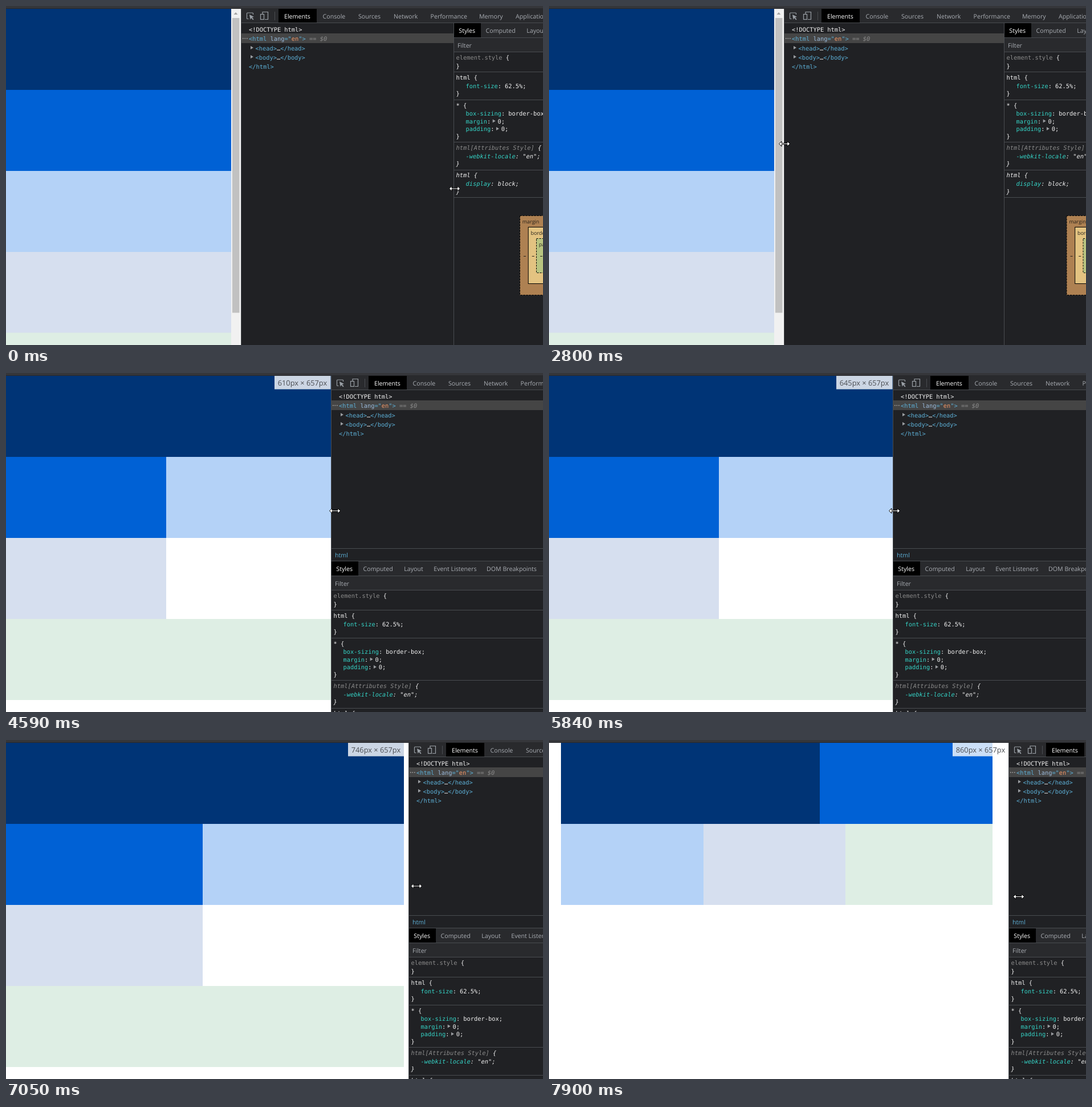
An HTML page that plays this animation: 942x594 px, repeating every 8000 ms.

```html
<!DOCTYPE html>
<html lang="en">
<head>
<meta charset="utf-8">
<title>Responsive layout resize</title>
<style>
html, body { margin: 0; width: 100%; height: 100%; overflow: hidden; background: #fff; }
svg { display: block; width: 942px; height: 594px; }
text { white-space: pre; text-rendering: geometricPrecision; }
.ui { font: 10.65px "Open Sans", "Noto Sans", sans-serif; fill: #a9adb3; }
.on { fill: #fff; }
.mono { font: 10.37px "DejaVu Sans Mono", "Noto Sans Mono", monospace; fill: #f2f2f2; }
.slant { font-style: italic; }
.tag { fill: #5db0d7; }
.attr { fill: #9bbbdc; }
.val { fill: #f29766; }
.dim { fill: #8b8b8b; }
.prop { fill: #35d4c7; }
.box { font: 9px "Open Sans", "Noto Sans", sans-serif; fill: #28221a; }
.size { font: 12.8px "Open Sans", "Noto Sans", sans-serif; fill: #4a4d52; }
</style>
</head>
<body>
<svg id="stage" viewBox="0 0 942 594"></svg>
<script>
const LOOP = 8000, SCALE = 0.946, CROP = 7.5, TOP = 5, ROW = 142;
const LINE = '#494c50', BAR = '#292a2d', BG = '#202124';
const COLORS = ['#003476', '#0061d5', '#b4d2f7', '#d6dfef', '#deeee4'];

const rect = (x, y, w, h, fill, extra = '') =>
  `<rect x="${x}" y="${y}" width="${w}" height="${h}" fill="${fill}" ${extra}/>`;
const rule = y => rect(0, y, 942, 1, LINE);
const text = (x, y, cls, body) => `<text x="${x}" y="${y}" class="${cls}">${body}</text>`;
const span = (cls, body) => `<tspan class="${cls}">${body}</tspan>`;
const tag = name => span('tag', `&lt;${name}&gt;`);
const arrow = (x, y) => `<path d="M${x} ${y - 3}l5 3l-5 3z" fill="#9a9da1"/>`;
const tabs = (y, list) => list.map(([x, name], i) =>
  text(x, y, i ? 'ui' : 'ui on', name)).join('');

function toolbar() {
  return rect(0, 5, 942, 25, BAR) + rule(29) +
    rect(66, 5, 67, 24, '#000') +
    `<g fill="none" stroke="#9aa0a6" stroke-width="1.2">
      <path d="M13.5 22.5H11.5Q10.5 22.5 10.5 21.5V13Q10.5 12 11.5 12H20.5Q21.5 12 21.5 13V15"/>
      <path d="M38 14V10.5H47.5V23.5H42"/><rect x="34.5" y="14.5" width="6" height="9"/>
    </g><path d="M15 15l8 4-3.4 1 3 3.2-1.4 1.2-3-3.3-1.6 3z" fill="#9aa0a6"/>` +
    rect(59, 10, 1, 15, LINE) +
    tabs(21.5, [[76, 'Elements'], [143.5, 'Console'], [206, 'Sources'], [268, 'Network'],
      [332.5, 'Performance'], [418, 'Memory'], [482, 'Application']]);
}

function tree() {
  const child = (y, name) => arrow(17, y - 4.5) +
    text(25.5, y, 'mono', tag(name) + '…' + tag('/' + name));
  return rect(0, 48, 942, 17, '#454545') +
    [3, 6.5, 10].map(x => rect(x, 56, 1.6, 1.6, '#a0a0a0')).join('') +
    text(14, 44.5, 'mono', '&lt;!DOCTYPE html&gt;') +
    text(14, 60.5, 'mono', span('tag', '&lt;html ') + span('attr', 'lang') +
      span('tag', '="') + span('val', 'en') + span('tag', '"&gt;') +
      span('dim slant', ' == $0')) +
    child(77.5, 'head') + child(93.5, 'body') +
    text(14, 109.5, 'mono', span('tag', '&lt;/html&gt;'));
}

function pane() {
  const code = (y, body, cls = '') => text(4.5, y, 'mono ' + cls, body);
  const decl = (y, name, value, cls = '') =>
    text(21.5, y, 'mono ' + cls, span('prop', name) + ': ' + value + ';');
  const folded = (y, name) => {
    const end = 21.5 + (name.length + 1) * 6.24;
    return text(21.5, y, 'mono', span('prop', name) + ':') +
      arrow(end + 3.5, y - 4) + text(end + 12.3, y, 'mono', '0;');
  };
  return rect(0, 30, 942, 600, BG) + rect(0, 30, 942, 50, BAR) +
    rect(1, 30, 47, 25, '#000') + [55, 80, 115, 164, 238, 287, 335].map(rule).join('') +
    tabs(47, [[9.3, 'Styles'], [56.5, 'Computed'], [128.3, 'Layout'],
      [180.3, 'Event Listeners'], [273, 'DOM Breakpoints']]) +
    text(7, 73, 'ui', 'Filter') +
    code(94, span('dim', 'element.style') + ' {') + code(109, '}') +
    code(129, 'html {') + decl(144, 'font-size', '62.5%') + code(157, '}') +
    code(177.5, '* {') + decl(192, 'box-sizing', 'border-box') +
    folded(205.5, 'margin') + folded(219, 'padding') + code(232, '}') +
    code(251.5, span('dim', 'html[Attributes Style]') + ' {', 'slant') +
    decl(267, '-webkit-locale', '"en"', 'slant') + code(280, '}', 'slant') +
    code(300, 'html {', 'slant') + decl(315, 'display', 'block', 'slant') +
    code(328.5, '}', 'slant') + rect(0, 30, 1, 600, LINE);
}

function boxModel() {
  const ring = (x, y, h, fill, name, dash) =>
    rect(x + .5, y + .5, 300 - 2 * x, h, fill,
      `stroke="#000" ${dash ? 'stroke-dasharray="3 2"' : ''}`) +
    text(x + 4.7, y + 14, 'box', name) + rect(x + 7, 438, 4, 1, '#28221a');
  return ring(0, 367, 139, '#ae8152', 'margin', true) +
    ring(14.7, 387, 99, '#e3c381', 'border', false) +
    ring(29, 407, 60, '#b8c480', 'padding', true);
}

document.getElementById('stage').innerHTML = `
  <rect width="942" height="594" fill="#fff"/>
  <g id="blocks">${COLORS.map(c => rect(0, 0, 0, ROW, c)).join('')}</g>
  <g id="scroll">${rect(0, 5, 16, 589, '#f1f1f1')}
    <path d="M4.5 15l3.5-4 3.5 4z" fill="#a3a3a3"/>
    <rect id="thumb" x="2" y="21" width="12.5" height="516.5"/></g>
  <g id="label">${rect(0, 5, 98.5, 23.5, '#fff', 'fill-opacity=".8"')}
    <text id="size" x="5.7" y="21.5" class="size"></text></g>
  <g id="tools">${rect(0, 5, 942, 589, BG)}${tree()}${toolbar()}
    <g id="crumb">${rect(0, 307, 942, 24, BG)}${rule(307)}${rule(329)}
      ${text(7, 322.5, 'ui', span('tag', 'html'))}</g>
    ${rect(0, 5, 1, 589, LINE)}</g>
  <g id="pane">${pane()}</g>
  <g id="model">${boxModel()}</g>
  ${rect(0, 0, 942, 5, '#35363a')}${rect(0, 4, 942, 1, '#28292c')}
  <path id="resize" d="M-9.5 0l4.5-4.5v3.5h10v-3.5l4.5 4.5-4.5 4.5v-3.5h-10v3.5z"
    fill="#fff" stroke="#000" stroke-width="1"/>
  <path id="pointer" d="M0 0v15l3.4-3.2 2.4 5.2 2.6-1.2-2.4-5h4.8z"
    fill="#fff" stroke="#111" stroke-width=".8"/>`;

const el = {};
document.querySelectorAll('#stage [id]').forEach(n => el[n.id] = n);

// The picture only changes at these moments.
const STEPS = [0, 720, 840, 990, 1290, 1430, 1570, 1710, 1850, 1990, 2130,
  2410, 2540, 2670, 2800, 3200, 3340, 3480, 3610, 3750, 3900, 4050, 4200,
  4350, 4470, 4590, 4730, 4870, 5000, 5140, 5280, 5430,
  5840, 5990, 6130, 6270, 6410, 6540, 6680, 6810,
  6930, 7050, 7200, 7340, 7480, 7620, 7760, 7900];

const WIDTH = [[2800, 443], [3200, 451], [3750, 512], [4590, 610], [4870, 627],
  [5280, 642], [5430, 645], [5840, 645], [7050, 746], [7900, 860]];
const LAG = [[2800, .5], [3750, 2], [4590, .5], [5840, .5], [7050, 8], [7900, 0]];
const SPLIT = [[600, 785], [720, 789], [990, 797], [1290, 798]];
const MOUSE_X = [[600, 787], [720, 791], [990, 799], [1290, 800], [1430, 720],
  [1710, 461], [1850, 428], [2130, 402], [2410, 405], [2800, 413], [3200, 428],
  [3750, 491], [4590, 577], [4870, 590], [5280, 603], [5430, 606], [5840, 606],
  [7050, 720], [7900, 824]];
const MOUSE_Y = [[1290, 320], [1710, 241.5], [5840, 241.5], [7050, 256], [7900, 274.5]];

function track(keys, t) {
  if (t <= keys[0][0]) return keys[0][1];
  for (let i = 1; i < keys.length; i++) {
    const [a, u] = keys[i - 1], [b, v] = keys[i];
    if (t <= b) return u + (v - u) * (t - a) / (b - a);
  }
  return keys[keys.length - 1][1];
}

// Each block as [left, right, row], in page pixels.
function layout(w) {
  if (w < 600) return COLORS.map((c, i) => [0, w - 17, i]);
  if (w < 800) return [[0, w, 0], [0, w / 2, 1], [w / 2, w, 1], [0, w / 2, 2], [0, w, 3]];
  const l = (w - 800) / 2;
  return [[l, l + 480, 0], [l + 480, l + 800, 0],
    [l, l + 264, 1], [l + 264, l + 528, 1], [l + 528, l + 800, 1]];
}

const move = (node, x, y = 0) => node.setAttribute('transform', `translate(${x} ${y})`);
const show = (node, on) => node.setAttribute('visibility', on ? 'visible' : 'hidden');
const toX = w => w * SCALE - CROP;

function draw(now) {
  const t = STEPS.filter(s => s <= now).pop();
  const w = Math.round(track(WIDTH, t));
  const right = toX(w);
  const x = Math.round(right + track(LAG, t));
  const narrow = w >= 600;
  const split = Math.round(track(SPLIT, t));
  const mx = Math.round(track(MOUSE_X, t)), my = track(MOUSE_Y, t);
  const pointing = t >= 1430 && t < 2670;

  layout(w).forEach(([a, b, row], i) => {
    const r = el.blocks.children[i];
    const left = Math.max(0, Math.round(toX(a)));
    r.setAttribute('x', left);
    r.setAttribute('width', Math.round(toX(b)) - left);
    r.setAttribute('y', TOP + row * ROW - (row === 4 ? .5 : 0));
  });
  show(el.scroll, !narrow);
  move(el.scroll, Math.round(right) - 17 + (w > 443 ? 1 : 0));
  el.thumb.setAttribute('fill', pointing && mx < 411 ? '#a8a8a8' : '#c1c1c1');

  show(el.label, t >= 3200);
  move(el.label, Math.round(right - 98.5));
  el.size.textContent = `${w}px × 657px`;

  move(el.tools, x);
  show(el.crumb, narrow);
  move(el.pane, narrow ? x : split, narrow ? 300 : 0);
  show(el.model, !narrow);
  move(el.model, 901 + (split - 785) / 2);

  show(el.pointer, pointing);
  show(el.resize, !pointing);
  move(pointing ? el.pointer : el.resize, mx, my);
}

function frame() {
  draw(performance.now() % LOOP);
  requestAnimationFrame(frame);
}
frame();
</script>
</body>
</html>
```
